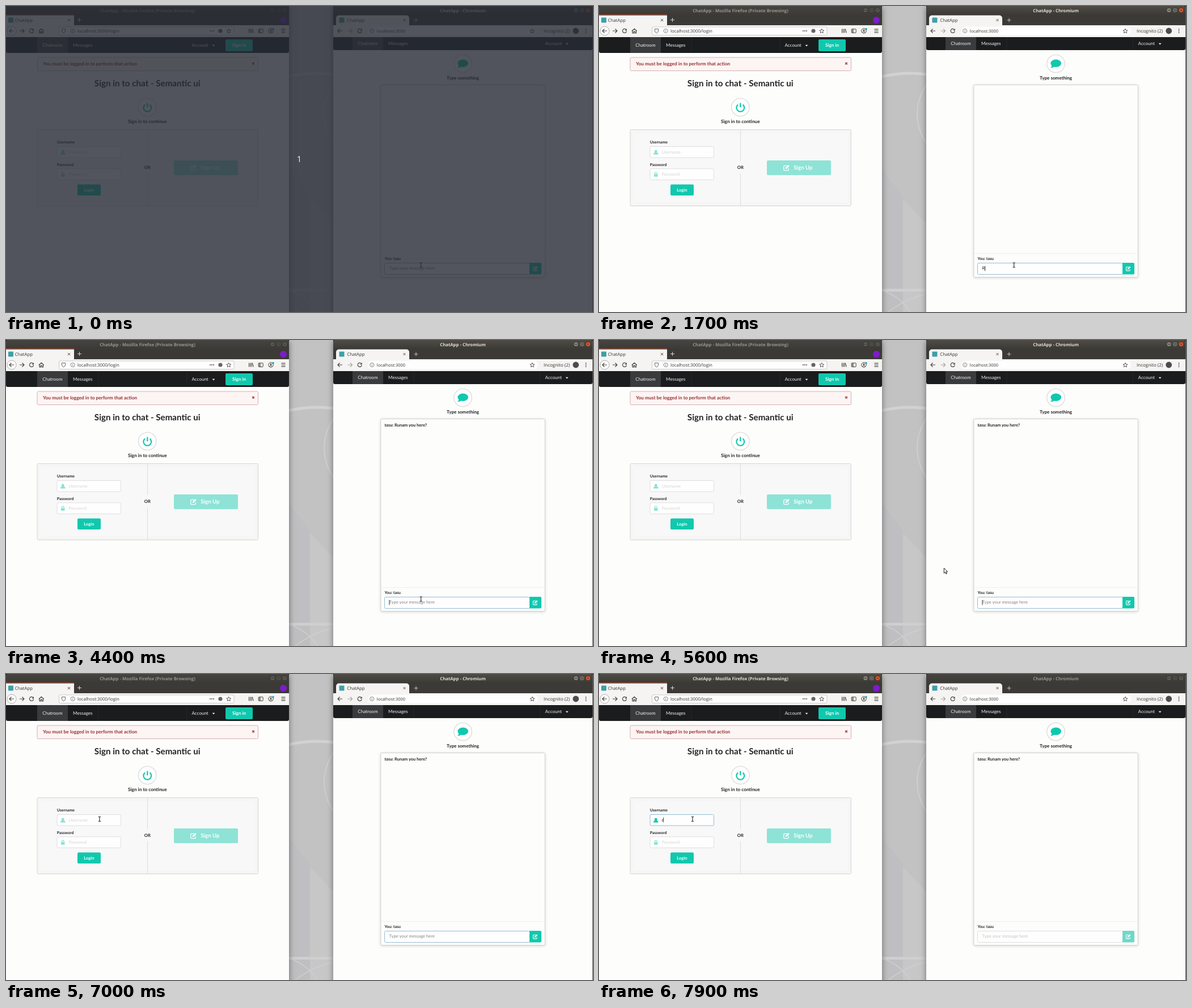
Recreate the animation shown at these times as an HTML page with a canvas. Size 1035 by 541 pixels, loop 8 s.

```html
<!DOCTYPE html>
<html lang="en">
<head>
<meta charset="utf-8">
<title>ChatApp</title>
<style>
html, body { margin: 0; width: 100%; height: 100%; overflow: hidden; background: #c3c2c3; }
canvas { display: block; width: 1035px; height: 541px; }
</style>
</head>
<body>
<canvas id="stage" width="1035" height="541"></canvas>
<script>
const ctx = document.getElementById('stage').getContext('2d');
const LOOP = 8000, STEP = 100;
const PAGE = 'Lato, sans-serif', SYS = '"Open Sans", "Noto Sans", sans-serif';
const TEAL = '#10c8ae', SOFT = '#8ee3d6', INK = '#222324', ICON = '#45453f', BAR = '#f5f4f2';
const USER = 'tasu', LINE = 'Runam you here?';

// Time at which the message has reached a given length.
const TYPED = [[1700, 1], [1800, 3], [1900, 4], [2000, 6], [2300, 7], [2500, 8], [2600, 9],
  [2700, 10], [2900, 11], [3100, 12], [3200, 13], [3400, 14], [4100, 15]];

function rect(x, y, w, h, fill, r = 0, stroke) {
  ctx.beginPath();
  ctx.roundRect(x, y, w, h, r);
  if (fill) { ctx.fillStyle = fill; ctx.fill(); }
  if (stroke) { ctx.strokeStyle = stroke; ctx.lineWidth = 1; ctx.stroke(); }
}

function disc(x, y, r, fill, stroke, width = 1) {
  ctx.beginPath();
  ctx.arc(x, y, r, 0, Math.PI * 2);
  if (fill) { ctx.fillStyle = fill; ctx.fill(); }
  if (stroke) { ctx.strokeStyle = stroke; ctx.lineWidth = width; ctx.stroke(); }
}

function path(d, x, y, stroke, width = 1, fill) {
  const p = new Path2D(d);
  ctx.save();
  ctx.translate(x, y);
  if (fill) { ctx.fillStyle = fill; ctx.fill(p); }
  if (stroke) { ctx.strokeStyle = stroke; ctx.lineWidth = width; ctx.stroke(p); }
  ctx.restore();
}

function text(s, x, y, size, color, { font = PAGE, style = '', align = 'left' } = {}) {
  ctx.font = `${style} ${size}px ${font}`;
  ctx.textAlign = align;
  ctx.fillStyle = color;
  ctx.fillText(s, x, y);
  return ctx.measureText(s).width;
}

const bold = (s, x, y, size, color, align) => text(s, x, y, size, color, { style: 'bold', align });
const sys = (s, x, y, size, color = '#33332f') => text(s, x, y, size, color, { font: SYS });
const cross = (x, y, r, color, w = 1) => path(`M${-r} ${-r}L${r} ${r}M${r} ${-r}L${-r} ${r}`, x, y, color, w);
const plus = (x, y, color) => path('M-3.5 0H3.5M0 -3.5V3.5', x, y, color, 1);
const arrow = (x, y, dir, color) =>
  path(`M${-4 * dir} 0H${4 * dir}M${.5 * dir} -3.5L${4 * dir} 0L${.5 * dir} 3.5`, x, y, color, 1.2);

function reload(x, y) {
  path('M3 -2.2A3.6 3.6 0 1 0 3.6 .6', x, y, ICON, 1.2);
  path('M4 -4V-.6H.6Z', x, y, null, 1, ICON);
}

function info(x, y) {
  disc(x, y, 3.6, null, '#777', .9);
  path('M0 -.6V2M0 -2.1V-1.3', x, y, '#777', .9);
}

const star = (x, y) =>
  path('M0 -4L1.2 -1.3L4 -1.1L1.8 .8L2.5 3.6L0 2L-2.5 3.6L-1.8 .8L-4 -1.1L-1.2 -1.3Z', x, y, ICON, .9);

function edit(x, y, k, color) {
  ctx.save();
  ctx.translate(x, y);
  ctx.scale(k, k);
  path('M1 -3.5H-3.3Q-4.5 -3.5 -4.5 -2.3V3.3Q-4.5 4.5 -3.3 4.5H2.3Q3.5 4.5 3.5 3.3V1', 0, 0, color, 1.2);
  path('M-1.8 1.9L-1.5 -.2L3.1 -4.8L5 -2.9L.4 1.7Z', 0, 0, null, 1, color);
  ctx.restore();
}

function favicon(x, y) {
  rect(x, y, 9, 9, '#3f9fa8', 1);
}

function titleBar(x, w, title, active, buttons) {
  const g = ctx.createLinearGradient(0, 0, 0, 15);
  g.addColorStop(0, active ? '#4f4c45' : '#454440');
  g.addColorStop(1, '#3c3b37');
  rect(x, 0, w, 16, g, [4, 4, 0, 0]);
  text(title, x + w / 2, 10.6, 7.75, active ? '#e2ded6' : '#98958c', { font: SYS, style: 'bold', align: 'center' });
  const marks = ['M-2 0H2', 'M-1.7 -1.7H1.7V1.7H-1.7Z', 'M-1.7 -1.7L1.7 1.7M1.7 -1.7L-1.7 1.7'];
  marks.forEach((d, i) => {
    const hot = active && i === 2;
    disc(buttons + i * 10.7, 7.5, 4.1, hot ? '#e8582c' : active ? '#85827a' : '#5c5a53', '#32312d', .8);
    path(d, buttons + i * 10.7, 7.5, hot ? '#5a1f0d' : '#31302c', .9);
  });
}

function nav(x, y, w, h, item, base) {
  rect(x, y, w, h, '#1b1c1d', [0, 0, 3, 3]);
  rect(item, y, 54, h, '#3a3b3c');
  rect(item + 107.5, y, 1, h, '#262728');
  text('Chatroom', item + 9.3, base, 8.05, '#f0f0f0');
  text('Messages', item + 63, base, 8.1, '#f0f0f0');
}

function account(x, base) {
  rect(x - 9.5, base - 14, 1, 23, '#262728');
  text('Account', x, base, 8.05, '#f0f0f0');
  path('M-2.4 -1.2H2.4L0 1.6Z', x + 38.5, base - 2, null, 1, '#f0f0f0');
}

function badge(x, y) {
  disc(x, y, 15.8, '#fefefe', '#e0e1e2', 1.6);
}

function wallpaper() {
  rect(499, 0, 78, 541, '#c3c2c3');
  path('M499 303L577 384V541H499Z', 0, 0, null, 1, '#c8c7c8');
  path('M499 290L536 336V541H499Z', 0, 0, null, 1, '#bfbec0');
  ctx.save();
  ctx.beginPath();
  ctx.rect(499, 0, 78, 541);
  ctx.clip();
  disc(549, 341, 222, null, '#d3d2d2', 5);
  disc(651, 191, 90, null, '#cfcecf', 2);
  rect(499, 500, 78, 5, '#d0cfcf');
  path('M499 503Q530 512 549 541M510 541Q540 518 577 509', 0, 0, '#d0cfcf', 1.5);
  ctx.restore();
}

function shadow(x, w) {
  ctx.save();
  ctx.shadowColor = 'rgba(0,0,0,.45)';
  ctx.shadowBlur = 10;
  rect(x, 2, w, 560, '#444');
  ctx.restore();
}

function field(y, label, hint, glyph, focus, value) {
  bold(label, 89.7, y - 4.8, 6.95, INK);
  rect(90, y + .5, 112.5, 19.5, '#fefefe', 2, focus ? '#96bcd2' : '#dededf');
  ctx.globalAlpha = .5 + .5 * focus;
  path(glyph, 100.3, y + 10.4, null, 1, TEAL);
  ctx.globalAlpha = 1;
  const w = value ? text(value, 110.4, y + 12.6, 7.6, INK) : 0;
  if (!value) text(hint, 110.4, y + 12.6, 7.6, focus ? '#bdbdbd' : '#d6d6d6');
  if (focus) rect(110.4 + w, y + 5.7, .9, 8.6, '#222');
}

function signInWindow(t, active, focus) {
  shadow(-10, 509);
  titleBar(0, 499, 'ChatApp - Mozilla Firefox (Private Browsing)', active, 470);
  rect(0, 15, 499, 19.5, '#3b3a36');
  rect(0, 16, 120, 19, BAR);
  rect(0, 15.6, 120, 1.5, '#e8603a');
  favicon(4, 20.5);
  sys('ChatApp', 15.8, 28, 7.75);
  cross(111, 25, 2.2, '#55544f');
  plus(129.5, 24.5, '#dad7cf');
  disc(489, 25, 6, '#7d1cc9');

  rect(0, 34, 499, 21, BAR);
  disc(10, 44, 8, '#fefefe', '#a9a8a4', .9);
  arrow(10, 44, -1, ICON);
  arrow(28, 44, 1, ICON);
  reload(45, 44);
  path('M-4.5 .3L0 -3.8L4.5 .3M-3.2 -.5V3.8H-1V1H1V3.8H3.2V-.5', 62.3, 44, ICON, 1.2);
  rect(93.5, 37, 308.5, 14.5, '#fefefe', 2, '#cac9c6');
  path('M-3 -3.5H3V0Q3 2.8 0 4Q-3 2.8 -3 0Z', 101.5, 44, '#666', 1);
  info(117.7, 44);
  sys('localhost:3000/login', 126, 47, 7.88);
  [-3, 0, 3].forEach(d => disc(363 + d, 44, 1, ICON));
  disc(378, 44, 3.6, '#66655f');
  star(392.7, 44.2);
  path('M-3.5 -3.5V3.5M-1.2 -3.5V3.5M1 -3.5V3.5M2.3 -3.3L4.3 3.5', 432, 44, ICON, 1.1);
  rect(445.2, 40.7, 8, 6.8, null, 1, ICON);
  rect(446, 41, 3, 6, '#8a8984');
  disc(467, 44, 4.2, null, ICON);
  disc(467, 43, 1.5, ICON);
  path('M-2.5 2.5Q0 .2 2.5 2.5', 467, 44, ICON);
  disc(471, 40.8, 1.8, '#0aa8b8');
  path('M-3.5 -2.8H3.5M-3.5 0H3.5M-3.5 2.8H3.5', 489, 44, ICON, 1.2);

  rect(0, 55, 499, 486, '#fdfdfc');
  nav(0, 55, 499, 28, 55, 72);
  account(327.5, 72);
  rect(387, 59, 48, 21, TEAL, 2);
  bold('Sign in', 411, 72, 8.15, '#f4fffd', 'center');

  rect(55, 91, 389.5, 23.5, '#fdf4f4', 2, '#d9b0af');
  bold('You must be logged in to perform that action', 65, 105, 8.38, '#93312f');
  cross(436, 101.7, 1.8, '#96504e', 1.5);
  bold('Sign in to chat - Semantic ui', 249.2, 142.3, 15.15, INK, 'center');
  badge(249.3, 179);
  path('M-4.2 -5.3A6.9 6.9 0 1 0 4.2 -5.3M0 -8V-.5', 249.3, 179.6, TEAL, 2.2);
  bold('Sign in to continue', 249.3, 207, 8.3, INK, 'center');

  rect(55, 218.5, 389.5, 135, '#f8f8f8', 2, '#d6d6d7');
  for (let i = 1; i < 8; i++) rect(55 + i, 218.5 + i, 389.5 - 2 * i, 135 - 2 * i, null, 2, `rgba(0,0,0,${.016 - i * .002})`);
  rect(249, 219, 1, 55, '#dcdcdd');
  rect(249, 296, 1, 57, '#dcdcdd');
  bold('OR', 249.3, 288, 7.7, INK, 'center');
  const person = 'M-4.2 4V2.6Q-4 .9 -1.7 .6Q-2.6 -.5 -2.4 -1.8Q-2.1 -4 0 -4Q2.1 -4 2.4 -1.8Q2.6 -.5 1.7 .6Q4 .9 4.2 2.6V4Z';
  const lock = 'M-3.2 -.5H-2.4V-2Q-2.2 -4.2 0 -4.2Q2.2 -4.2 2.4 -2V-.5H3.2V4H-3.2ZM-1.2 -.5H1.2V-2Q1.1 -3 0 -3Q-1.1 -3 -1.2 -2Z';
  field(248, 'Username', 'Username', person, focus, t >= 7900 ? 'r' : '');
  field(287.3, 'Password', 'Password', lock, 0, '');
  rect(126, 315.5, 41, 19.5, TEAL, 2);
  bold('Login', 146.4, 327.7, 7.55, '#f4fffd', 'center');
  rect(296, 273, 113, 26, SOFT, 2);
  edit(330.5, 286, 1.05, '#fbfffe');
  bold('Sign Up', 343.3, 289.2, 9.7, '#fbfffe');
}

function chatWindow(t, active) {
  shadow(577, 457);
  titleBar(577, 457, 'ChatApp - Chromium', active, 1005);
  rect(577, 15, 457, 20, '#3b3a36');
  rect(582, 16.5, 129, 20, BAR, [5, 5, 0, 0]);
  favicon(587.5, 20.5);
  sys('ChatApp', 601.2, 28, 7.85);
  cross(702.5, 25, 2, '#55544f');
  plus(723, 25, '#c4c1b9');
  rect(577, 34, 457, 21, BAR);
  arrow(589, 44, -1, ICON);
  arrow(606.5, 44, 1, '#a5a49f');
  reload(623.7, 44);
  rect(638, 36.8, 300, 14.6, '#fefefe', 7.3);
  info(645.2, 44);
  sys('localhost:3000', 653.8, 47, 7.45);
  star(928, 44.2);
  sys('Incognito (2)', 948, 47, 8);
  disc(1004.7, 44, 5.4, '#4b4c4d');
  [-3, 0, 3].forEach(d => disc(1022.5, 44 + d, .9, ICON));

  rect(577, 55, 457, 486, '#fdfdfc');
  nav(577, 55, 457, 23, 611, 69);
  account(950.6, 69);
  badge(805.5, 102);
  ctx.beginPath();
  ctx.ellipse(805.7, 101.3, 9.3, 6.8, 0, 0, Math.PI * 2);
  ctx.fillStyle = TEAL;
  ctx.fill();
  path('M-7 3Q-7.5 6.5 -9.6 8Q-5.5 8.2 -2.5 5.5Z', 805.7, 101.3, null, 1, TEAL);
  bold('Type something', 805.6, 129.5, 8.1, INK, 'center');

  ctx.save();
  ctx.shadowColor = 'rgba(34,36,38,.22)';
  ctx.shadowBlur = 5;
  ctx.shadowOffsetY = 1;
  rect(660.8, 139.5, 289.5, 340, '#fdfdfc', 2);
  ctx.restore();
  rect(660.8, 139.5, 289.5, 340, '#fdfdfc', 2, '#d0d1d2');
  rect(661.5, 437, 288, 1, '#efefef');
  if (t >= 4400) {
    const w = text(USER, 667.6, 152.8, 7.5, INK, { style: 'italic bold' });
    bold(': ' + LINE, 667.6 + w, 152.8, 7.5, INK);
  }
  bold('You: ' + USER, 667.6, 449.3, 7, INK);

  rect(667.5, 454.5, 256, 20, '#fefefe', 2, active ? '#96bcd2' : '#dededf');
  rect(923, 454, 21, 20.5, active ? TEAL : '#6fd8c9', [0, 2, 2, 0]);
  edit(933.2, 464.3, .85, '#fbfffe');
  const last = t < 4400 ? TYPED.filter(([at]) => t >= at).pop() : null;
  const draft = last ? LINE.slice(0, last[1]) : '';
  const w = draft ? text(draft, 675.6, 466.1, 7.6, INK) : 0;
  if (!draft) text('Type your message here', 675.6, 466.1, 7.65, active ? '#858585' : '#c4c4c4');
  const blink = t < 300 || (t >= 900 && t < 1500) || (t >= 4000 && t < 4100) || t >= 6200;
  if (!blink) rect(675.5 + w, 459.8, .9, 8.6, '#222');
  rect(1034, 0, 1, 541, '#55534e');
}

// Each leg: start, duration, from, to. The first step is already under way.
const LEGS = [
  [5500, 500, [731.7, 458], [381, 302]],
  [6200, 400, [381, 302], [245.2, 218.6]],
  [6700, 400, [245.2, 218.6], [165, 256.5]],
];

function pointer(t) {
  let pos = LEGS[0][2];
  for (const [start, span, a, b] of LEGS) {
    if (t < start) break;
    const u = Math.min(1, (t - start + STEP) / span);
    const e = u * u * (3 - 2 * u);
    pos = a.map((v, i) => v + (b[i] - v) * e);
  }
  const [x, y] = pos;
  const inChat = x > 667 && x < 923 && y > 454;
  const inField = x > 90 && x < 203 && y > 248 && y < 268;
  if (inChat || inField) {
    const beam = 'M-2.2 -4H-.6L0 -3.5L.6 -4H2.2M0 -3.5V3.5M-2.2 4H-.6L0 3.5L.6 4H2.2';
    path(beam, x, y, 'rgba(255,255,255,.8)', 2.4);
    path(beam, x, y, '#222', 1.1);
  } else {
    path('M0 0V9.2L2.1 7.3L3.6 10.6L5.1 9.9L3.6 6.8H6.5Z', x, y, '#222', 1, '#fdfdfc');
  }
}

function draw(t) {
  const focused = t >= 7100;
  const focus = focused ? Math.min(1, .25 + (t - 7100) / 500) : 0;
  ctx.textRendering = 'geometricPrecision';
  wallpaper();
  signInWindow(t, focused, focus);
  chatWindow(t, !focused);
  pointer(t);
  if (t < 300) {
    rect(0, 0, 1035, 541, 'rgba(39,43,53,.8)');
    text('1', 517, 276, 15, '#f1efea', { font: SYS, align: 'center' });
  }
}

function tick(now) {
  draw(Math.floor((now % LOOP) / STEP) * STEP);
  requestAnimationFrame(tick);
}
draw(0);
requestAnimationFrame(tick);
</script>
</body>
</html>
```
